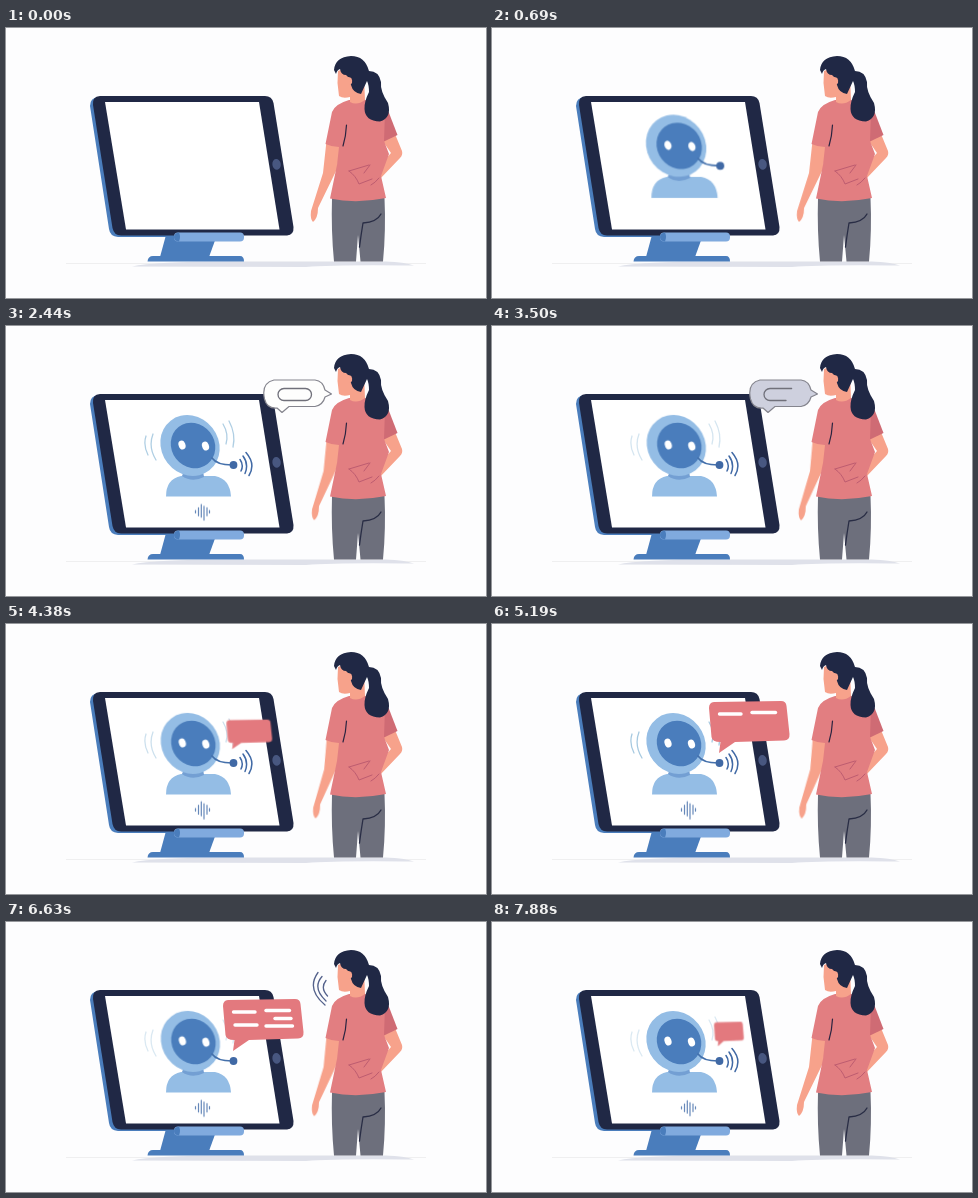
Recreate the animation shown at these times as an HTML page. Size 480 by 270 pixels, loop 7950 ms.

```html
<!DOCTYPE html>
<html lang="en">
<head>
<meta charset="utf-8">
<title>Assistant chat</title>
<style>
html, body { margin: 0; width: 100%; height: 100%; overflow: hidden; background: #fdfdfe; }
svg { display: block; width: 100vw; height: 100vh; }
.line { fill: none; stroke-linecap: round; stroke-linejoin: round; }
.navy { fill: #202845; }
.blue { fill: #4a7dbc; }
.sky { fill: #94bde5; }
.skin { fill: #f7a28b; }
.shirt { fill: #e27e81; }

.anim { animation: 7.95s linear infinite; }
.robot { animation-name: robot; transform-origin: 192px 170px; animation-timing-function: ease-out; }
.head { animation: nod 2.65s ease-in-out infinite; transform-origin: 188px 150px; }
.arm { animation-name: arm; transform-origin: 328px 100px; animation-timing-function: ease-in-out; }
.ears { animation-name: ears; }
.ears path { animation: pulse 1.325s ease-in-out infinite; }
.wave { animation-name: wave; }
.wave path { animation: bar .53s ease-in-out infinite alternate; transform-origin: 196px 186px; }
.ask { animation-name: ask; transform-origin: 325px 68px; animation-timing-function: ease-out; }
.tint { animation-name: tint; }
.clip { animation-name: clip; stroke-dasharray: 100 110; }
.reply { animation-name: reply; transform-origin: 225px 120px; animation-timing-function: ease-in-out; }

/* Staggered parts start inside the previous loop, so nothing shows early. */
.mic path { animation: mic 7.95s linear calc(var(--i) * 90ms - 7.95s) infinite; }
.call path { animation: call 7.95s linear calc(var(--i) * 90ms - 7.95s) infinite; }
.text path { animation: write 7.95s linear calc(var(--i) * 240ms - 7.95s) infinite; stroke-dasharray: 100 110; }

@keyframes robot {
  0%, 3% { opacity: 0; transform: translateY(12px) scale(.75); }
  8% { opacity: 1; transform: translateY(-1px) scale(1.03); }
  11%, 100% { opacity: 1; transform: none; }
}
@keyframes nod { 50% { transform: rotate(.8deg); } }
@keyframes arm { 0%, 100% { transform: none; } 65% { transform: rotate(-1.6deg); } }
@keyframes ears { 0%, 11% { opacity: 0; } 15%, 65% { opacity: 1; } 83%, 100% { opacity: .4; } }
@keyframes pulse { 0%, 100% { opacity: 1; } 50% { opacity: .35; } }
@keyframes wave {
  0%, 12% { opacity: 0; } 15%, 38% { opacity: 1; }
  41%, 48% { opacity: 0; } 52%, 100% { opacity: 1; }
}
@keyframes bar { from { transform: scaleY(1.06); } to { transform: scaleY(.9); } }
@keyframes mic {
  0%, 19% { opacity: 0; } 21%, 68% { opacity: 1; }
  71%, 91% { opacity: 0; } 93%, 97.5% { opacity: 1; } 97.6%, 100% { opacity: 1; }
}
@keyframes call { 0%, 74% { opacity: 0; } 77%, 87% { opacity: 1; } 90%, 100% { opacity: 0; } }
@keyframes ask {
  0%, 21% { opacity: 0; transform: scale(.1); }
  23% { opacity: 1; }
  25%, 47.5% { opacity: 1; transform: none; }
  51%, 100% { opacity: 0; transform: scale(.1); }
}
@keyframes tint { 0%, 39% { fill: #fefefd; } 43%, 100% { fill: #ced0de; } }
@keyframes clip {
  0%, 25% { stroke-dashoffset: 101; } 30%, 41% { stroke-dashoffset: 0; }
  44% { stroke-dashoffset: 29; } 47.5%, 100% { stroke-dashoffset: 101; }
}
@keyframes reply {
  0%, 53% { opacity: 0; transform: scale(0); }
  54% { opacity: 1; }
  57% { transform: scale(1.04); }
  59%, 96.5% { opacity: 1; transform: none; }
  99.1%, 100% { opacity: 1; transform: scale(.37, .47); }
}
@keyframes write {
  0%, 59.4% { stroke-dashoffset: 101; opacity: 0; }
  59.5% { opacity: 1; }
  62%, 84.5% { stroke-dashoffset: 0; opacity: 1; }
  86%, 100% { stroke-dashoffset: 101; opacity: 0; }
}
/* The first frame is an empty screen. */
.mic { animation-name: late; }
@keyframes late { 0%, 15% { opacity: 0; } 15.1%, 100% { opacity: 1; } }
</style>
</head>
<body>
<svg viewBox="0 0 480 270">
  <!-- ground -->
  <path d="M60 235.500H420" stroke="#efeff0" stroke-width="1"/>
  <path d="M126 238.500Q150 233 238 233.500H380Q398 234 408 237.500Q330 236.500 300 239Z" fill="#dfe1ea"/>

  <!-- tablet and stand -->
  <path class="blue" d="M160 207H211L203 229H154Z"/>
  <path class="blue" d="M147 228H234Q238 228 238 233.500H141.500Q142 228 147 228Z"/>
  <path class="blue" d="M92 69Q84 70 84 78L103 201Q104 208.500 112 209H172L110 69Z"/>
  <path class="navy" d="M94 68H259Q266 68 267.500 75L287.500 199Q288 207 281 207.500H115Q108 207.500 106.500 200L87 77Q86 68.500 94 68Z"/>
  <path d="M99 74H253L273.500 201.500H120Z" fill="#fff"/>
  <ellipse cx="270.500" cy="136.500" rx="4.200" ry="5.400" transform="rotate(-8 270 136)" fill="#485780"/>
  <rect x="168" y="204.500" width="70" height="9" rx="4" fill="#80aade"/>
  <path class="blue" d="M173 204.500Q175 209 173 213.500Q168 213 168 209T173 204.500Z"/>

  <!-- robot -->
  <g class="anim robot">
    <path class="sky" d="M160 170.500Q160 153 175 150H209Q224 153 225 170.500Z"/>
    <path d="M176 150Q186 157 198 151L197 145H178Z" fill="#739fd3"/>
    <g class="head">
      <ellipse class="sky" cx="184" cy="119.500" rx="28.500" ry="31.500" transform="rotate(-38 184 119.500)"/>
      <ellipse class="blue" cx="187" cy="119.500" rx="21.500" ry="23.500" transform="rotate(-38 187 119.500)"/>
      <ellipse cx="176" cy="119" rx="3.400" ry="4.600" transform="rotate(-20 176 119)" fill="#fff"/>
      <ellipse cx="199.500" cy="120" rx="3.400" ry="4.600" transform="rotate(-20 199.500 120)" fill="#fff"/>
    </g>
    <path class="line" d="M206 132Q211 139 226 139" stroke="#4470ab" stroke-width="1.600"/>
    <circle cx="227.500" cy="139" r="3.900" fill="#4069a5"/>
  </g>
  <g class="anim ears line" stroke="#a3c7df" stroke-width="1.300">
    <path d="M147 108Q142 121 150 134"/>
    <path d="M140 110Q137 119 142 129"/>
    <path d="M217 98Q223 108 220 118"/>
    <path d="M223 95Q230 108 227 121"/>
  </g>
  <g class="anim wave line" stroke="#6688b9" stroke-width="1.200">
    <path d="M189.500 184.500V187M192.500 181.500V190M195.300 178V191.500M198 180V194.500M201 181.500V190M203.500 184.500V187"/>
  </g>
  <g class="anim mic line" stroke="#4069a5" stroke-width="1.500">
    <path style="--i:0" d="M234 133.500Q238 139 235 145"/>
    <path style="--i:1" d="M237 130Q243 138 239 147.500"/>
    <path style="--i:2" d="M240 126.500Q250 138 243 149.500"/>
  </g>

  <!-- woman -->
  <path d="M326 170H378.500Q380 202 377 233.500H354.500L352 207L350 233.500H328Q325 203 326 170Z" fill="#6d6f7c"/>
  <path class="line" d="M375 186Q371 194 357 195Q355 207 353.500 219" stroke="#292d45" stroke-width="1.300"/>
  <path class="skin" d="M389 106L396 123Q397 127 394 130L373 152L369 143L385 125L376 112Z"/>
  <g class="anim arm">
    <path class="skin" d="M320.500 113H335L331 141L312 180Q312 190 307 194Q304 191 305 183L317 145Z"/>
  </g>
  <path d="M374 78Q381 80 383 85L391.500 107L377 114Z" fill="#cf6b74"/>
  <path class="shirt" d="M343 72Q329 76 326 84L319.500 116Q326 119 333 119L331 137L324 170.500Q350 176 380 170L375 148L383 126L378 113L379 84Q373 75 359 72Z"/>
  <path class="line" d="M340.500 97Q340 108 337 118" stroke="#2a2440" stroke-width="1.200"/>
  <path class="line" d="M343 143L363 137M343 143Q350 148 353 156L366 151M364 137L358 145M373 150Q369 155 365 157" stroke="#bd5c70" stroke-width="1"/>
  <path class="skin" d="M332 43L331.500 55L333 68Q337 71 344 69V74Q351 78 359 72L358 48L344 38Z"/>
  <path class="navy" d="M328 42Q329 29 345 28Q359 28 363 43Q373 43 375 54Q374 63 382 75Q386 90 374 93.500Q359 93 358.500 81Q358 74 363 64Q363 57 361 53L355 66Q347 65 345 57Q344 50 340 47Q335 47 334 41Q331 42 330 46Z"/>
  <path class="skin" d="M341 49Q347 48 346 55Q344 58 341 55Z"/>
  <g class="call line" stroke="#53618b" stroke-width="1.300">
    <path style="--i:0" d="M320 58.500Q314 66 321.500 74"/>
    <path style="--i:1" d="M316 54.500Q306 66 320 79"/>
    <path style="--i:2" d="M312 50.500Q300 67 319 83"/>
  </g>

  <!-- speech bubbles -->
  <g class="anim ask">
    <path class="anim tint" d="M268 54H309Q317 55 319 64L325.500 68L319 71Q317 79 309 80.500H283L276 86.500L271 82Q261 83 258.500 73Q255 57 268 54Z" stroke="#85858e" stroke-width="1.200" stroke-linejoin="round"/>
    <path class="anim line clip" pathLength="100" d="M294 74.500H278A6 6 0 0 1 278 62.500H299.500A6 6 0 0 1 299.500 74.500H294" stroke="#70707a" stroke-width="1.300"/>
  </g>
  <g class="anim reply">
    <path d="M222 78L289 77Q294 77 294.500 82L297.500 110Q298 116 292 116.500L243 118L227 129L228.500 118Q220 118 219.500 113L217 84Q217 78.500 222 78Z" fill="#e3797e"/>
    <g class="text line" stroke="#fff" stroke-width="3.400">
      <path style="--i:0" pathLength="100" d="M227.500 90H249"/>
      <path style="--i:1" pathLength="100" d="M260 88.500H283.500"/>
      <path style="--i:2" pathLength="100" d="M229 103H251"/>
      <path style="--i:3" pathLength="100" d="M269 96.500H285"/>
      <path style="--i:4" pathLength="100" d="M260 104H286.500"/>
    </g>
  </g>
</svg>
</body>
</html>
```
